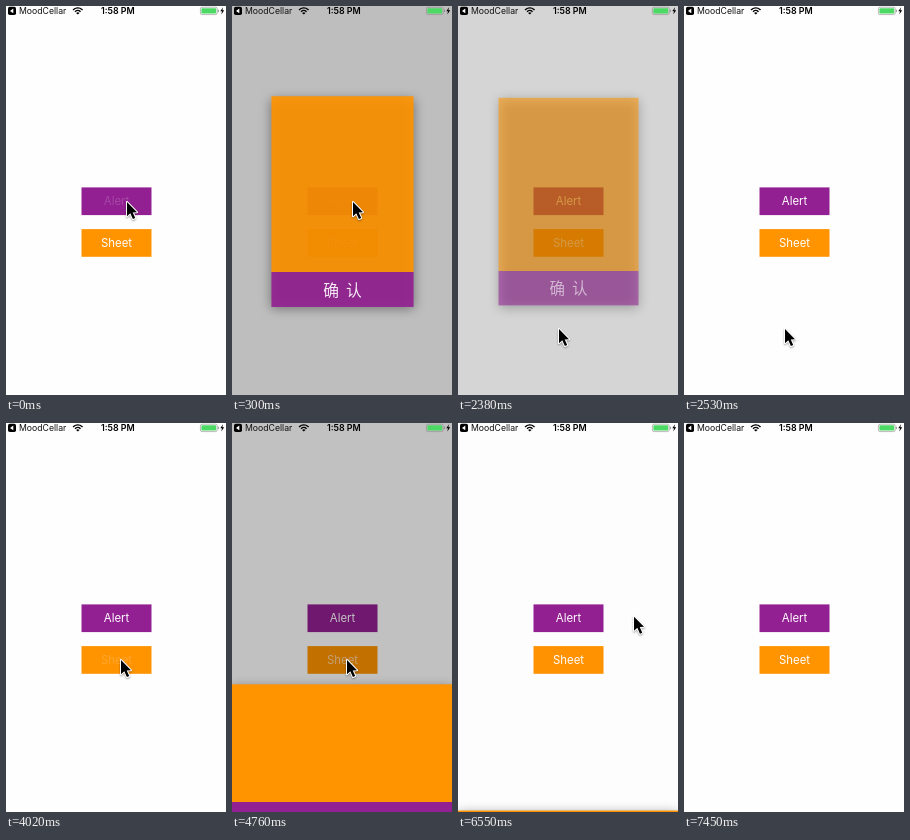
An HTML page with a canvas for the animation above (8.35 s loop, 220 px wide and 389 px high).

```html
<!DOCTYPE html>
<html lang="en">
<head>
<meta charset="utf-8">
<title>Alert and sheet</title>
<style>
  html, body { margin: 0; width: 100%; height: 100%; overflow: hidden; background: #fefefe; }
  canvas { display: block; width: 100vw; height: 100vh; }
</style>
</head>
<body>
<canvas id="stage"></canvas>
<script>
const W = 220, H = 389, LOOP = 8350, TICK = 148.8;
const PURPLE = '#932092', ORANGE = '#ff9300', DIM = 0.28;
const LATIN = 'Inter, Roboto, sans-serif';
const HAN = '"Noto Sans CJK SC", "Noto Sans CJK", sans-serif';

const canvas = document.getElementById('stage');
const ctx = canvas.getContext('2d');
const dpr = window.devicePixelRatio || 1;
canvas.width = Math.round(W * dpr);
canvas.height = Math.round(H * dpr);

const mix = (a, b, p) => a + (b - a) * p;

// Eased progress of k between ticks a and b
function ease(k, a, b) {
  const p = Math.min(1, Math.max(0, (k - a) / (b - a)));
  return p * p * (3 - 2 * p);
}

function poly(points) {
  ctx.beginPath();
  points.forEach(([x, y], i) => i ? ctx.lineTo(x, y) : ctx.moveTo(x, y));
  ctx.closePath();
}

function label(str, x, y, font, color, align = 'center') {
  ctx.font = font;
  ctx.fillStyle = color;
  ctx.textAlign = align;
  ctx.textBaseline = 'alphabetic';
  ctx.fillText(str, x, y);
}

function button(str, y, color, textAlpha) {
  ctx.fillStyle = color;
  ctx.fillRect(75.5, y, 70, 27.7);
  label(str, 110.5, y + 18, '11.4px ' + LATIN, `rgba(255,255,255,${textAlpha})`);
}

function statusBar() {
  ctx.fillStyle = '#000';
  ctx.beginPath();
  ctx.roundRect(2, 0.8, 8, 8.2, 1.8);
  ctx.fill();
  ctx.fillStyle = '#fff';
  poly([[4, 4.9], [7.3, 2.6], [7.3, 7.2]]);
  ctx.fill();

  label('MoodCellar', 13, 8, '8.7px ' + LATIN, '#111', 'left');
  label('1:58 PM', 111.8, 8, '600 8.9px ' + LATIN, '#000');

  // Wi-Fi
  ctx.strokeStyle = '#000';
  ctx.lineWidth = 1.4;
  for (const r of [3.7, 6.3]) {
    ctx.beginPath();
    ctx.arc(71.8, 8.2, r, -Math.PI * 0.77, -Math.PI * 0.23);
    ctx.stroke();
  }
  ctx.fillStyle = '#000';
  ctx.beginPath();
  ctx.moveTo(71.8, 8.6);
  ctx.arc(71.8, 8.6, 2.3, -Math.PI * 0.77, -Math.PI * 0.23);
  ctx.fill();

  // Battery
  ctx.strokeStyle = '#8c8c8c';
  ctx.lineWidth = 0.6;
  ctx.beginPath();
  ctx.roundRect(194.4, 1.2, 16.8, 7.4, 1.6);
  ctx.stroke();
  ctx.fillStyle = '#4cd964';
  ctx.beginPath();
  ctx.roundRect(195.4, 2.2, 14.8, 5.4, 0.8);
  ctx.fill();
  ctx.fillStyle = '#8c8c8c';
  ctx.fillRect(211.9, 3.7, 0.9, 2.4);
  ctx.fillStyle = '#000';
  poly([[217, 1.2], [214.3, 5.3], [216, 5.3], [215.3, 8.6], [218.2, 4.3], [216.4, 4.3]]);
  ctx.fill();
}

function dim(alpha) {
  ctx.fillStyle = `rgba(0,0,0,${alpha})`;
  ctx.fillRect(0, 0, W, H);
}

// Orange panel with a purple confirm bar starting at splitY
function panel(x, y, w, h, splitY) {
  const fill = ctx.createLinearGradient(0, y, 0, y + h);
  const stop = (splitY - y) / h;
  fill.addColorStop(0, ORANGE);
  fill.addColorStop(stop, ORANGE);
  fill.addColorStop(stop, PURPLE);
  fill.addColorStop(1, PURPLE);
  ctx.save();
  ctx.shadowColor = 'rgba(0,0,0,0.45)';
  ctx.shadowBlur = 11 * dpr;
  ctx.shadowOffsetY = 2.5 * dpr;
  ctx.fillStyle = fill;
  ctx.fillRect(x, y, w, h);
  ctx.restore();
  label('确  认', x + w / 2, splitY + 23.2, '500 15.5px ' + HAN, '#fff');
}

function alertBox(alpha, scale) {
  ctx.save();
  ctx.globalAlpha = alpha;
  ctx.translate(110.5, 195.6);
  ctx.scale(scale, scale);
  panel(-70, -103.8, 140, 207.6, 69.4);
  ctx.restore();
}

function cursor(x, y) {
  ctx.save();
  ctx.translate(x, y + 1);
  poly([[0, 0], [0, 14.2], [3.3, 11.2], [5.9, 17], [8.2, 16], [5.7, 10.4], [10, 10.2]]);
  ctx.lineJoin = 'round';
  ctx.strokeStyle = '#fff';
  ctx.lineWidth = 2;
  ctx.shadowColor = 'rgba(0,0,0,0.35)';
  ctx.shadowBlur = 2 * dpr;
  ctx.shadowOffsetY = dpr;
  ctx.stroke();
  ctx.shadowColor = 'transparent';
  ctx.fillStyle = '#000';
  ctx.fill();
  ctx.restore();
}

// Cursor moves: start tick, end tick, target
const START = [121, 195];
const MOVES = [
  [7, 12, 101, 322],
  [17, 21, 115, 236],
  [35, 39, 176, 188],
  [43.5, 49, 177, 387]
];

function cursorAt(k) {
  let [x, y] = START;
  for (const [a, b, tx, ty] of MOVES) {
    const p = ease(k, a, b);
    x = mix(x, tx, p);
    y = mix(y, ty, p);
  }
  return [x, y];
}

function draw(k) {
  ctx.setTransform(canvas.width / W, 0, 0, canvas.height / H, 0, 0);
  ctx.fillStyle = '#fefefe';
  ctx.fillRect(0, 0, W, H);

  const alertIn = ease(k, 0.45, 2.35);
  const alertOut = ease(k, 15.5, 16.6);
  const alertShow = alertIn * (1 - alertOut);
  const sheetShow = ease(k, 30.4, 32.5) * (1 - ease(k, 42.4, 44.1));

  const alertText = mix(0.18, 1, ease(k, 2, 4));
  const sheetText = k < 27 ? 1 : mix(0.18, 1, ease(k, 31, 33));
  button('Alert', 181.4, PURPLE, alertText);
  button('Sheet', 223.1, ORANGE, sheetText);

  const shade = Math.max(alertShow, sheetShow);
  if (shade > 0) dim(DIM * shade);
  statusBar();
  if (alertShow > 0) alertBox(alertShow, mix(1.17, 1, alertIn));
  if (sheetShow > 0) {
    const y = mix(H, 240, sheetShow);
    panel(0, y, W, 153, y + 118);
  }
  if (k < 50) cursor(...cursorAt(k));
}

function frame() {
  const t = performance.now() % LOOP;
  draw(Math.floor((t + 5) / TICK));
  requestAnimationFrame(frame);
}
frame();
</script>
</body>
</html>
```
